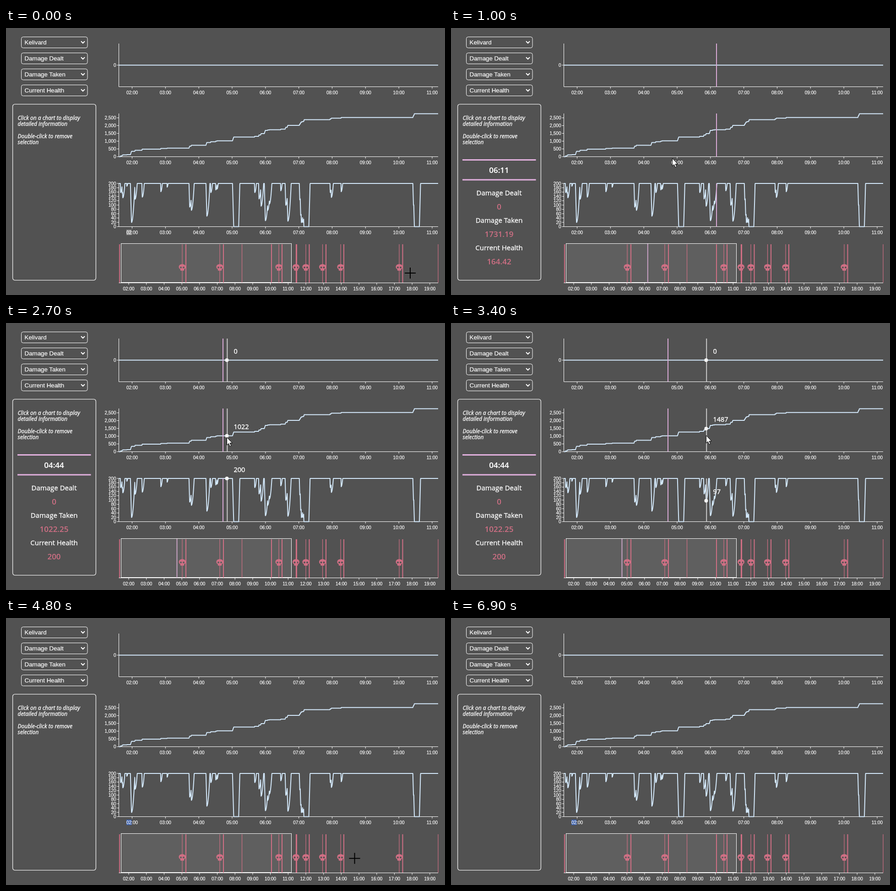
An HTML page for the animation above (7 s loop, 959 by 584 pixels).

```html
<!DOCTYPE html>
<html lang="en">
<head>
<meta charset="utf-8">
<title>Match timeline</title>
<style>
  html, body { margin: 0; width: 100%; height: 100%; overflow: hidden; background: #525252; }
  svg { display: block; width: 959px; height: 584px; }
  text { fill: #fff; stroke: #fff; stroke-width: .2; font-family: "Open Sans", "Noto Sans", sans-serif; }
  .tick { font: 10px "Liberation Sans", Arial, sans-serif; }
  .menu { font: 13.33px "Liberation Sans", Arial, sans-serif; }
  .hint { font-size: 12px; font-style: italic; stroke-width: .35; }
  .name { font-size: 15px; stroke-width: .35; }
  .num { font-size: 17px; font-weight: 600; }
  .pink { fill: #cf6f84; stroke: none; }
  .tip { font-size: 14.5px; stroke-width: .4; }
  .mid { text-anchor: middle; }
  .end { text-anchor: end; }
  .axis { stroke: #fff; fill: none; }
  .data { stroke: #d3e8fa; stroke-width: 2; fill: none; stroke-linejoin: round; }
  .pick { stroke: #d8a8d5; stroke-width: 2; }
  .mini { stroke: #c9a2c4; stroke-width: 2; }
  .hover { stroke: #cacaca; stroke-width: 2; }
  .rule { stroke: #e2b0de; stroke-width: 3; }
  .thin { stroke: #cf6f84; stroke-width: 1.2; }
  .thick { stroke: #cf6f84; stroke-width: 2; }
</style>
</head>
<body>
<svg id="stage" viewBox="0 0 959 584" xmlns="http://www.w3.org/2000/svg"></svg>
<script>
const stage = document.getElementById('stage');
const LEFT = 246.5, RIGHT = 944, LOOP = 7000;

function add(tag, attrs, parent = stage, content) {
  const el = document.createElementNS('http://www.w3.org/2000/svg', tag);
  set(el, attrs);
  if (content !== undefined) el.textContent = content;
  parent.appendChild(el);
  return el;
}
function set(el, attrs) {
  for (const key in attrs) el.setAttribute(key, attrs[key]);
}
const label = (x, y, cls, content, parent) => add('text', { x, y, class: cls }, parent, content);
const line = (x, y1, y2, cls, parent) => add('line', { x1: x, x2: x, y1, y2, class: cls }, parent);
const path = (d, cls, parent) => add('path', { d, class: cls }, parent);
const moveTo = (el, x) => set(el, { x1: x, x2: x });
const show = (el, on) => set(el, { visibility: on ? 'visible' : 'hidden' });
const pad = n => String(n).padStart(2, '0');

// Linear value of column k at the position in column 0
function sample(points, at, k = 1) {
  const i = points.findIndex(p => p[0] >= at);
  if (i < 1) return points[i < 0 ? points.length - 1 : 0][k];
  const a = points[i - 1], b = points[i];
  return a[k] + (b[k] - a[k]) * (at - a[0]) / (b[0] - a[0]);
}

// Every hit taken, as position:damage; both curves follow from these
const hits = `250:50 253.5:35 255:30 264:15 272:215 281.5:65 297:75 338:45 352:20 400:130 404.5:55
  437:180 447:50 458:35 461:22.25 495:240 543:50 552:85 556.5:90 564.5:205 571.5:24 575.4:14.94
  600:40 610:120 614.5:125 641:90 643:90 645:45 648:25 650.5:120 708:50 710.5:40 732:45 889:120 891:122`
  .split(/\s+/).map(p => p.split(':').map(Number));

function simulate() {
  const step = 0.25, armour = 0.84, fallRate = 90, regen = 6.4, downTime = 11;
  const taken = [], health = [], queue = [...hits];
  let hp = 200, total = 0, pending = 0, calm = 0, down = 0;
  for (let x = LEFT; x <= RIGHT; x += step) {
    while (queue.length && queue[0][0] <= x) pending += queue.shift()[1];
    const damage = Math.min(pending, fallRate * step);
    pending -= damage;
    total += damage;
    calm = damage ? 0 : calm + step;
    hp = Math.max(0, hp - damage * armour);
    if (hp > 0) down = 0;
    if (hp === 0 && down < downTime) down += step;
    else hp = Math.min(200, hp + regen * calm * step);
    taken.push([x, total]);
    health.push([x, hp]);
  }
  return { taken, health };
}

const { taken, health } = simulate();
const range = (n, step) => Array.from({ length: n }, (_, i) => i * step);
const charts = [
  { name: 'Damage Dealt', scale: 1, lift: 47.3, ticks: [0], points: [[LEFT, 0], [RIGHT, 0]] },
  { name: 'Damage Taken', scale: 0.034, lift: 0, ticks: range(6, 500), points: taken },
  { name: 'Current Health', scale: 0.4725, lift: 0, ticks: range(11, 20), points: health }
].map((c, i) => {
  const base = 128.5 + i * 153;
  return { ...c, base, top: base - 94.5, y: v => base - c.lift - v * c.scale };
});

const chartX = minute => 275.5 + (minute - 2) * 72.83;
const minuteAt = x => 2 + (x - 275.5) / 72.83;
const overviewX = minute => 268 + (minute - 2) * 38.7;

function timeAxis(y, to, xOf) {
  path(`M${LEFT} ${y}H${RIGHT}`, 'axis');
  for (let m = 2; m <= to; m++) {
    line(xOf(m), y, y + 4, 'axis');
    label(xOf(m), y + 16, 'tick mid', pad(m) + ':00');
  }
}

// Menus and info panel
['Kelivard', ...charts.map(c => c.name)].forEach((name, i) => {
  const y = 19.5 + i * 35;
  add('rect', { x: 33.5, y, width: 144.5, height: 24, rx: 4, class: 'axis' });
  label(40.5, y + 16.5, 'menu', name);
  add('path', { d: `M164 ${y + 9.5}l4 4 4-4`, fill: 'none', stroke: '#fff', 'stroke-width': 2 });
});
add('rect', { x: 14.6, y: 166.6, width: 181.8, height: 385, rx: 5, fill: 'none', stroke: '#e8e8e8', 'stroke-width': 1.4 });
[['Click on a chart to display', 'detailed information'], ['Double-click to remove', 'selection']]
  .forEach((pair, i) => pair.forEach((s, j) => label(25.5, 200.5 + i * 40 + j * 13.7, 'hint', s)));

const mark = add('rect', { x: 263, y: 441, width: 11.5, height: 12 });

// Charts
for (const c of charts) {
  path(`M${LEFT} ${c.top}V${c.base}`, 'axis');
  for (const v of c.ticks) {
    path(`M${LEFT - 4} ${c.y(v)}H${LEFT}`, 'axis');
    label(240.5, c.y(v) + 3.5, 'tick end', v.toLocaleString('en-US'));
  }
  timeAxis(c.base, 11, chartX);
  path('M' + c.points.map(([x, v]) => `${x} ${c.y(v).toFixed(1)}`).join('L'), 'data');
}

// Overview with brush, deaths and respawns
add('rect', { x: 251.5, y: 471.5, width: 372, height: 85, fill: '#5f5f5f', stroke: '#fff' });
const skull = 'M-7.5-1C-7.5-9 7.5-9 7.5-1Q7.5 2.5 4.2 4V6Q4.2 7.2 3 7.2H-3Q-4.2 7.2-4.2 6V4Q-7.5 2.5-7.5-1Z' +
  'M-5 .2a2 2 0 1 0 4 0a2 2 0 1 0-4 0ZM1 .2a2 2 0 1 0 4 0a2 2 0 1 0-4 0Z';
const deaths = [385, 467, 596, 633.5, 655, 691.5, 731, 859];
const respawns = [248, 393, 475, 580, 603, 635, 662.5, 699, 738, 866.5];
for (const x of respawns) line(x, 473, 557, 'thick');
for (const x of [515.5, RIGHT, ...deaths]) line(x, 473, 557, 'thin');
for (const x of deaths) {
  set(path(skull, 'pink'), { 'fill-rule': 'evenodd', transform: `translate(${x} 523.5)` });
}
timeAxis(557.5, 19, overviewX);

// Picked moment
const pick = add('g', {});
const pickLines = charts.map(c => line(0, c.top, c.base, 'pick', pick));
const pickMini = line(0, 472, 557, 'mini', pick);
path('M25 288.5H185.5M25 332H185.5', 'rule', pick);
const clock = label(105, 317, 'num mid', '', pick);
const readings = charts.map((c, i) => {
  label(105, 366 + i * 60, 'name mid', c.name, pick);
  return label(105, 397 + i * 60, 'num pink mid', '', pick);
});

// Hovered moment
const hover = add('g', {});
const probes = charts.map(c => ({
  c,
  rule: line(0, c.top, c.base, 'hover', hover),
  dot: add('circle', { r: 4, fill: '#f4f4f4' }, hover),
  tip: label(0, 0, 'tip', '', hover)
}));

const arrow = add('path', { d: 'M-.5-1V16L3.3 12.5 6 18.8 8.8 17.6 6.1 11.5H11.2Z', fill: '#fff', stroke: '#000' });
const cross = add('path', { d: 'M-12 0H12M0-12V12', stroke: '#000', 'stroke-width': 2 });

// Pointer stops: time, x, y
const track = [
  [0, 883, 536], [600, 580, 235], [1000, 484, 286], [2000, 474, 248], [2500, 474, 248],
  [2700, 483, 251], [3700, 590, 245], [4200, 651, 320], [4900, 780, 560], [5100, 780, 560],
  [5700, 759, 571], [6000, 759, 571], [6200, 735, 540], [6400, 735, 540], [6900, 540, -30]
];
const picks = [
  { from: 600, to: 2500, x: 580, values: [0, 1731.19, 164.42] },
  { from: 2500, to: 3700, x: 474, values: [0, 1022.25, 200] }
];

function drawPick(t) {
  const p = picks.find(p => t >= p.from && t < p.to);
  show(pick, p);
  show(mark, !p);
  set(mark, { fill: t < 600 ? '#8a8a8a' : '#3b5fa9' });
  if (!p) return;
  const minute = minuteAt(p.x), secs = Math.round(minute * 60);
  for (const l of pickLines) moveTo(l, p.x);
  moveTo(pickMini, overviewX(minute));
  clock.textContent = pad(Math.floor(secs / 60)) + ':' + pad(secs % 60);
  readings.forEach((r, i) => r.textContent = p.values[i]);
}

function drawHover(x, y) {
  const on = x > LEFT && x < RIGHT && charts.some(c => y >= c.top && y <= c.base);
  show(hover, on);
  if (!on) return;
  for (const { c, rule, dot, tip } of probes) {
    const v = sample(c.points, x), py = c.y(v);
    moveTo(rule, x + 0.3);
    set(dot, { cx: x - 0.5, cy: py });
    set(tip, { x: x + 14.5, y: py - 14.5 });
    tip.textContent = Math.round(v);
  }
}

function draw(now) {
  const t = Math.floor(now % LOOP / 100) * 100;
  const x = sample(track, t), y = sample(track, t, 2);
  drawPick(t);
  drawHover(x, y);
  show(arrow, y < 472);
  show(cross, y >= 472);
  for (const pointer of [arrow, cross]) set(pointer, { transform: `translate(${x} ${y})` });
}

const start = performance.now();
function loop() {
  draw(performance.now() - start);
  requestAnimationFrame(loop);
}
loop();
</script>
</body>
</html>
```
